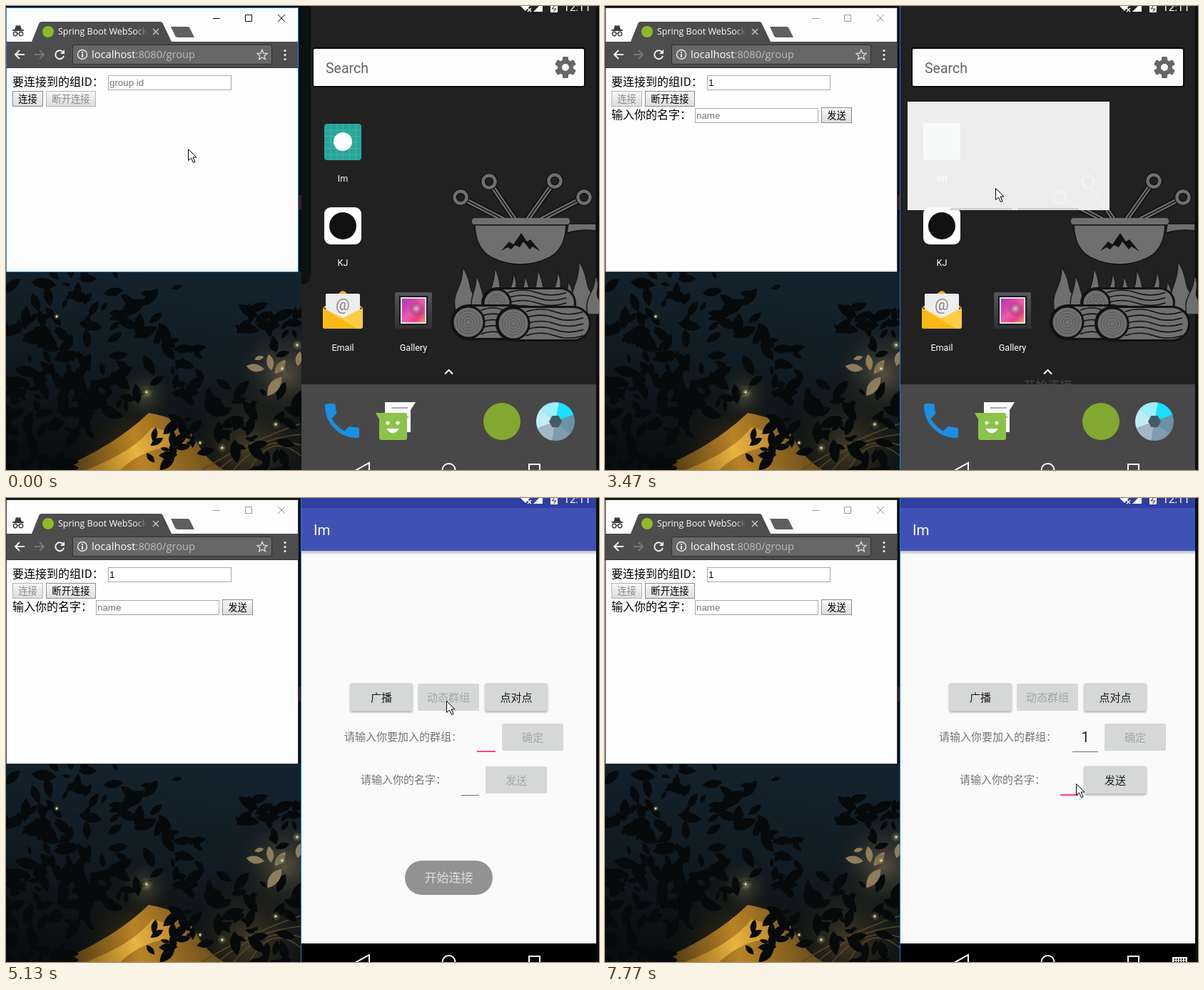
Write an HTML page with a canvas that moves like this. It is 831 px wide and 650 px high and loops after 8 s.

```html
<!DOCTYPE html>
<html lang="zh">
<head>
<meta charset="utf-8">
<style>
html, body { margin: 0; width: 100%; height: 100%; overflow: hidden; background: #080c0e; }
canvas { display: block; }
</style>
</head>
<body>
<canvas id="stage" width="831" height="650"></canvas>
<script>
const W = 831, H = 650, LOOP = 8000;
const CJK = '"Noto Sans CJK SC","Noto Sans CJK",sans-serif';
const ROBOTO = 'Roboto,sans-serif', SEGOE = '"Open Sans",sans-serif', ARIAL = '"Liberation Sans",sans-serif';
const PINK = '#ff4081', BLUE = '#1883d7';
const SWITCH = 2900; // the phone window takes the focus
const stage = document.getElementById('stage').getContext('2d');
let g = stage;

// Drawing helpers
function box(x, y, w, h, color, r = 0) {
  g.fillStyle = color;
  g.beginPath();
  g.roundRect(x, y, w, h, r);
  g.fill();
}
function frame(x, y, w, h, color, lw = 1) {
  g.strokeStyle = color;
  g.lineWidth = lw;
  g.strokeRect(x + lw / 2, y + lw / 2, w - lw, h - lw);
}
function disc(x, y, r, color, stroke, lw = 1) {
  g.beginPath();
  g.arc(x, y, r, 0, 7);
  if (color) { g.fillStyle = color; g.fill(); }
  if (stroke) { g.strokeStyle = stroke; g.lineWidth = lw; g.stroke(); }
}
function shape(d, color, stroke, lw = 1) {
  const p = new Path2D(d);
  if (color) { g.fillStyle = color; g.fill(p); }
  if (stroke) { g.strokeStyle = stroke; g.lineWidth = lw; g.stroke(p); }
}
function text(s, x, y, size, color, font = CJK, align = 'left') {
  g.font = size + 'px ' + font;
  g.textAlign = align;
  g.fillStyle = color;
  g.fillText(s, x, y);
}
function fade(gradient, ...colors) {
  colors.forEach((c, i) => gradient.addColorStop(i / (colors.length - 1), c));
  return gradient;
}
function glow(x, y, r, color) {
  box(x - r, y - r, 2 * r, 2 * r, fade(g.createRadialGradient(x, y, 0, x, y, r), color, 'transparent'));
}
function at(x, y, k, draw) {
  g.save();
  g.translate(x, y);
  g.scale(k, k);
  draw();
  g.restore();
}
function layer(draw) {
  const c = document.createElement('canvas');
  c.width = W;
  c.height = H;
  g = c.getContext('2d');
  draw();
  g = stage;
  return c;
}
let seed = 23;
const rnd = () => (seed = seed * 16807 % 2147483647) / 2147483647;

// Desktop wallpaper: foliage, golden light, sparks
function leaves(x, y, spread, n, color = '#060a0b') {
  while (n--) {
    const r = 6 + 12 * rnd();
    g.save();
    g.translate(x + spread * (rnd() + rnd() - 1), y + spread * .7 * (rnd() + rnd() - 1));
    g.rotate(rnd() * 6.3);
    shape(`M${-r} 0Q0 ${-r * .9} ${r} 0Q0 ${r * .8} ${-r} 0`, color);
    g.restore();
  }
}
function drawDesk() {
  box(0, 0, W, H, '#080f12');
  box(0, 372, 414, 278, fade(g.createLinearGradient(200, 372, 150, 650), '#13232d', '#101b22', '#0a0e10'));
  glow(390, 515, 85, 'rgba(135,115,80,.6)');
  glow(340, 620, 110, 'rgba(105,85,45,.6)');
  glow(185, 630, 110, 'rgba(120,85,25,.55)');
  glow(195, 545, 45, 'rgba(110,110,75,.55)');
  shape('M70 650Q150 618 200 570Q252 578 268 612Q280 635 305 650Z',
    fade(g.createLinearGradient(90, 650, 280, 600), '#4d3812', '#b98326', '#6e501d'));
  shape('M112 650Q180 624 205 590Q245 600 255 618Q200 612 160 650Z',
    fade(g.createLinearGradient(115, 650, 250, 605), '#94691d', '#e9b440', '#b07d25'));
  for (let i = 0; i < 4; i++)
    shape(`M${275 + i * 22} 650Q${335 + i * 12} ${612 - i * 6} 413 ${585 + i * 15}`, null, '#574722', 1.5);
  [[150, 405, 110, 34], [50, 440, 90, 26], [40, 510, 100, 50], [120, 540, 90, 40], [30, 600, 100, 50],
    [240, 500, 80, 22], [240, 610, 48, 16], [300, 560, 70, 26], [370, 450, 70, 22], [340, 620, 70, 18], [385, 560, 50, 12]]
    .forEach(mass => leaves(...mass));
  leaves(380, 510, 50, 6, '#8d7d5c');
  [[197, 541, 13], [378, 586, 9], [408, 475, 10], [71, 435, 6], [303, 619, 9], [272, 612, 6], [387, 508, 9]]
    .forEach(([x, y, r]) => {
      glow(x, y, r, 'rgba(200,195,135,.75)');
      disc(x, y, 1.4, '#e6dfb8');
    });
  box(409, 265, 5, 20, '#431a1b');
}

function flame(x, tip, w, lean) {
  const base = 432, mid = (tip + base) / 2;
  shape(`M${x - w} ${base}C${x - w * 1.7} ${mid} ${x + lean} ${mid} ${x + lean} ${tip}` +
    `C${x + lean + w} ${tip + 18} ${x + w * .3} ${mid - 4} ${x + w * .8} ${mid + 4}Q${x + w * 1.6} ${mid + 16} ${x + w} ${base}Z`,
    '#6f6f6f', '#1b1b1b', 1.5);
}
function drawCampfire() {
  const grey = '#6f6f6f', ink = '#121212';
  [[637, 268, 697], [677, 246, 713], [769, 245, 731], [810, 268, 750]].forEach(([x, y, end]) => {
    const stick = `M${x} ${y}L${end} 299`;
    shape(stick, null, ink, 10);
    shape(stick, null, grey, 6);
    shape(stick, null, ink, 1.5);
    disc(x, y, 8.5, '#212121', ink, 7);
    disc(x, y, 8.5, null, grey, 4.5);
  });
  shape('M788 305H827V315Q805 312 786 318Z', grey, ink, 1.5);
  shape('M657 306H785Q784 340 762 352Q742 362 721 362Q700 362 680 352Q658 340 657 306Z', grey, ink, 1.5);
  box(653, 297, 137, 9, grey, 4);
  box(657, 306, 129, 1.5, ink);
  shape('M694 343L705 330L711 334L722 318L730 330L735 327L749 344L738 337L734 341L725 330L720 338L713 335L708 341L703 338Z', ink);
  [[644, 366, 13, -4], [663, 377, 9, -4], [687, 367, 10, -2], [708, 374, 9, 3], [729, 378, 9, -2],
    [749, 369, 9, -4], [771, 372, 9, 2], [791, 384, 8, -3], [808, 358, 13, -5], [823, 376, 8, 3]].forEach(f => flame(...f));
  [[688, 416, 108, 19], [648, 443, 85, 22], [711, 445, 106, 22]].forEach(([x, y, len, r]) => {
    box(x - r - 3, y - r - 3, len + r + 6, 2 * r + 6, ink, r + 3);
    box(x - r, y - r, len + r, 2 * r, grey, r);
    for (let k = -2; k < 3; k++) {
      const v = y + k * r * .38;
      shape(`M${x + r * .8} ${v}q${len * .2} -7 ${len * .38} 0t${len * .38} 0`, null, ink, 1.6);
    }
    disc(x, y, r, grey, ink, 3);
    for (let k = 4; k < r - 3; k += 4) disc(x, y, k, null, '#555', 1);
  });
}

function statusIcons() {
  shape('M720 -1H735L728 7ZM739 8L752 -5V8Z', '#fff');
  shape('M731 3l5 5m0-5l-5 5', null, '#fff', 1.5);
  box(763, -2, 10, 11, '#fff', 1);
  shape('M768.5 0l-3 4h5l-3 4', null, '#444', 1.2);
  text('12:11', 781, 7, 15.4, '#fff', ROBOTO);
}
function navKeys() {
  shape('M509 640V660L491 650Z', null, '#fff', 2);
  disc(620.5, 650, 9, null, '#fff', 2);
  frame(732, 641, 17, 18, '#fff', 2);
}

function drawHome() {
  box(414, 0, 413, H, '#212121');
  drawCampfire();
  statusIcons();
  box(429, 58, 383, 56, '#0a0a0a', 4);
  box(431, 60, 379, 52, '#fdfdfd', 2);
  text('Search', 448, 93.5, 19.5, '#666', ROBOTO);
  at(784, 86, 1, () => {
    for (let i = 0; i < 3; i++) {
      box(-4, -15, 8, 30, '#666', 1.5);
      g.rotate(Math.PI / 3);
    }
    disc(0, 0, 8, '#fdfdfd', '#666', 6);
  });
  box(446, 165, 52, 51, '#26a69a', 4);
  for (let i = 1; i < 6; i++) {
    box(446 + i * 8.7, 165, 1, 51, '#45b3a8');
    box(446, 165 + i * 8.5, 52, 1, '#45b3a8');
  }
  disc(472, 190, 13, '#fff');
  box(446, 282, 52, 52, '#fff', 9);
  disc(472, 308, 19, '#111');
  // Mail and pictures
  shape('M444 423L468 401Q472 397 476 401L500 423Z', '#f7a81b');
  box(448, 403, 48, 40, '#ededed', 2);
  text('@', 472, 426, 22, '#858585', ROBOTO, 'center');
  shape('M444 423L472 437L500 423V449Q500 452 497 452H447Q444 452 444 449Z', '#ffcd45');
  shape('M444 423L492 452H447Q444 452 444 449Z', '#fbb917');
  box(545, 401, 52, 51, fade(g.createLinearGradient(0, 401, 0, 452), '#54565c', '#303034'), 2);
  box(551, 406, 40, 41, '#1a1a1c');
  box(553, 408, 36, 37, '#e9e4e6');
  box(555, 410, 32, 33, fade(g.createLinearGradient(555, 410, 587, 443), '#9a45b5', '#d23fae', '#ee5cae', '#e4408a', '#f59a55'));
  glow(575, 424, 11, 'rgba(255,215,240,.8)');
  [['Im', 472, 246], ['KJ', 472, 364], ['Email', 472, 482.5], ['Gallery', 571, 482.5]]
    .forEach(([s, x, y]) => text(s, x, y, 12.6, '#fff', ROBOTO, 'center'));
  shape('M615 515.5L620.5 510L626 515.5', null, '#fff', 2);
  // Dock
  box(414, 530, 413, 120, '#484848');
  at(439, 549, 2.67, () => shape('M6.6 10.8c1.4 2.8 3.8 5.1 6.6 6.6l2.2-2.2c.3-.3.7-.4 1-.2 1.1.4 2.3.5 3.6.5.6 0 1 .5 1 1V20c0 .6-.4 1-1 1C10.6 21 3 13.4 3 4c0-.6.5-1 1-1h3.5c.6 0 1 .4 1 1 0 1.2.2 2.5.6 3.6.1.3 0 .7-.3 1Z', '#1b8fe2'));
  shape('M531 555H574L567 566V597H531Z', '#fafafa');
  box(540, 562, 23, 2, '#aaa');
  box(556, 575, 8, 2, '#aaa');
  shape('M518 570H560Q562 570 562 573V605Q562 608 559 608H526Q523 608 523 605V579Z', '#8bc34a');
  disc(535, 584, 2.5, '#fff');
  disc(549, 584, 2.5, '#fff');
  shape('M533 592Q542 605 551 592Z', '#fff');
  disc(695, 582, 26, '#83a82f');
  ['#18e0ff', '#6a93a8', '#7f9dae', '#9fb9c6', '#c0edf5', '#9eeefb'].forEach((c, i) => {
    const a = -1.4 + i * Math.PI / 3;
    g.fillStyle = c;
    g.beginPath();
    g.moveTo(770, 582);
    g.arc(770, 582, 27, a, a + 1.06);
    g.fill();
  });
  shape('M761 582L765.5 574H774.5L779 582L774.5 590H765.5Z', '#455a64');
  navKeys();
}

// Browser window
function field(x, y, value, hint, focus) {
  box(x, y, 173, 21, '#fff');
  frame(x, y, 173, 21, focus ? '#5b9dd9' : '#a9a9a9', focus ? 2 : 1);
  text(value || hint, x + 2, y + 15, 13.33, value ? '#000' : '#757575', ARIAL);
}
function webButton(s, x, y, w, on) {
  box(x, y, w, 22, fade(g.createLinearGradient(0, y, 0, y + 22), '#f8f8f8', '#dcdcdc'));
  frame(x, y, w, 22, on ? '#8c8c8c' : '#b4b4b4');
  text(s, x + w / 2, y + 16, 13.33, on ? '#000' : '#8a8a8a', CJK, 'center');
}
function drawBrowser(t) {
  const active = t < SWITCH, joined = t >= 1780, ink = active ? '#111' : '#999';
  box(0, 2, 410, 371, active ? BLUE : '#3b3f42');
  box(1, 3, 408, 369, '#fdfdfd');
  shape('M36 50L46 25Q47 22 50 22H216Q219 22 220 25L232 50Z', '#4d4d4d');
  shape('M231 29H254Q256 29 257 30L264 44H241Q238 44 237 42Z', '#606060');
  disc(59, 36, 8, '#8fb92c');
  g.save();
  g.beginPath();
  g.rect(70, 22, 126, 28);
  g.clip();
  text('Spring Boot WebSocket', 73, 40, 12.5, fade(g.createLinearGradient(182, 0, 197, 0), '#fff', '#4d4d4d'), SEGOE);
  g.restore();
  shape('M206 32l8 8m0-8l-8 8', null, '#ccc', 1.4);
  shape('M290 17.5h10M335.5 12.5h9v9h-9zM381 12l10 10m0-10l-10 10', null, ink);
  shape('M12 33L14 27Q17 28 20 27L22 33Z', '#3c3c3c');
  box(9, 33, 16, 2, '#3c3c3c', 1);
  disc(13, 39, 2.7, null, '#3c3c3c', 1.4);
  disc(21, 39, 2.7, null, '#3c3c3c', 1.4);
  box(16, 38, 2, 1, '#3c3c3c');
  box(1, 50, 408, 36, '#4d4d4d');
  box(1, 86, 408, 1, '#333');
  shape('M26 68H13M19 62L13 68L19 74', null, '#eee', 2);
  shape('M40 68H53M47 62L53 68L47 74', null, '#777', 2);
  shape('M80 64.5A6 6 0 1 0 81 70', null, '#eee', 2);
  shape('M82 61V67H76Z', '#eee');
  box(93, 54, 280, 28, '#303030', 3);
  box(94, 55, 278, 26, '#676767', 2);
  disc(107, 68, 6.5, null, '#eee', 1.4);
  box(106, 67, 2, 5, '#eee');
  box(106, 64, 2, 2, '#eee');
  text('localhost', 120, 73, 14.7, '#fff', SEGOE);
  text(':8080/group', 120 + g.measureText('localhost').width, 73, 14.7, '#bbb', SEGOE);
  shape('M359 61.5l2 4.6 5 .4-3.800 3.300 1.200 4.900-4.400-2.600-4.400 2.600 1.200-4.900-3.800-3.300 5-.4Z', null, '#ddd', 1.3);
  [62, 68, 74].forEach(y => disc(391, y + .5, 1.6, '#eee'));

  text('要连接到的组ID：', 9, 112, 16, '#000');
  field(143, 97, t >= 900 ? '1' : '', 'group id', t >= 530 && !joined);
  webButton('连接', 9, 119, 43, !joined);
  webButton('断开连接', 56, 119, 70, joined);
  if (joined) {
    text('输入你的名字：', 9, 158, 16, '#000');
    field(126, 143, '', 'name');
    webButton('发送', 303, 142, 43, true);
  }
}

// Phone app
function appButton(s, x, y, on) {
  if (on) {
    g.save();
    g.shadowColor = 'rgba(0,0,0,.35)';
    g.shadowBlur = 3;
    g.shadowOffsetY = 1.5;
    box(x - .5, y - .5, 87, 39, '#d6d7d7', 2);
    g.restore();
  } else box(x, y, 86, 38, '#d6d7d7', 2);
  text(s, x + 43, y + 24.5, 15, on ? '#1c1c1c' : '#a5a6a6', CJK, 'center');
}
function underline(x, y, w, focus) {
  if (focus) box(x, y - 1, w, 2, PINK);
  else box(x, y, w, 1, '#757575');
}
function drawApp(t) {
  const dy = t < 4670 ? 1 : 0, group = t >= 4800, y = group ? 260 : 265;
  box(414, 0, 413, H, '#fafafa');
  box(414, 74 + dy, 413, 5, fade(g.createLinearGradient(0, 74, 0, 80), 'rgba(0,0,0,.25)', 'transparent'));
  box(414, 14, 413, 60 + dy, '#3f51b5');
  box(414, 0, 413, 14 + dy, '#303f9f');
  statusIcons();
  text('Im', 431, 52 + dy, 20.5, '#fff', ROBOTO);
  box(414, 624 + dy, 413, 26, '#000');
  navKeys();
  appButton('广播', 483, y, group);
  appButton('动态群组', 577, y, !group);
  appButton('点对点', 672, y, true);
  if (group) {
    const typed = t >= 6150, sure = t >= 6540, naming = t >= 7200, shift = typed ? 5 : 0;
    text('请输入你要加入的群组：', 474 - shift * 1.2, 340, 15, '#757575');
    underline(660 - shift, 355, typed ? 36 : 26, !naming);
    if (typed) text('1', 673, 342, 20, '#222', ROBOTO, 'center');
    if (typed && !naming) box(676.5, 321, 2, 27, PINK);
    appButton('确定', 695 + shift, 316, typed && !sure);
    text('请输入你的名字：', 497, 400, 15, '#757575');
    underline(638, 416, 25, naming);
    appButton('发送', 672, 376, sure);
    if (t >= 5950) {
      box(795, 643, 21, 10, '#fff', 1);
      for (let i = 0; i < 10; i++) box(797.5 + i % 5 * 3.5, 645 + (i / 5 | 0) * 3, 2, 2, '#000');
    }
  } else {
    text('请输入你的名字：', 544, 345, 15, '#757575');
    underline(681, 361, 25, true);
    appButton('发送', 577, 377, true);
  }
  g.globalAlpha = track(toast, t)[0];
  box(559, 508, 123, 48, '#646464', 24);
  text('开始连接', 620.5, 538, 17, '#fff', CJK, 'center');
  g.globalAlpha = 1;
}

// First glimpse of the app window, over the home screen
function drawOpening() {
  box(424, 134, 283, 152, 'rgba(250,250,250,.94)');
  box(446, 164, 52, 52, '#f6faf9', 3);
  text('Im', 472, 246, 12.6, '#fff', ROBOTO, 'center');
  box(484, 283, 86, 3, '#d0d1d1');
  box(578, 283, 86, 3, '#d0d1d1');
  text('开始连接', 620.5, 538, 17, '#484848', CJK, 'center');
}

// Timing: bursts of evenly spaced steps with rests between
const bursts = [[0, 0, 1], [120, 960, 7], [1370, 2360, 8], [2480, 3470, 8], [3590, 4520, 8], [4670, 5640, 8], [5910, 6930, 9], [7080, 7770, 6]];
function snap(t) {
  const [from, to, n] = bursts.findLast(b => t >= b[0]);
  if (n < 2) return from;
  const step = (to - from) / (n - 1);
  return Math.min(to, from + Math.floor((t - from) / step + .2) * step);
}
function track(keys, t) {
  const i = keys.findIndex(k => k[0] > t);
  if (i < 0) return keys.at(-1).slice(1);
  if (!i) return keys[0].slice(1);
  const a = keys[i - 1], b = keys[i], u = (t - a[0]) / (b[0] - a[0]);
  return a.slice(1).map((v, k) => v + (b[k + 1] - v) * u);
}
const toast = [[3500, 0], [3723, .74], [4000, 1], [4900, 1], [5086, .69], [5250, 0], [5370, 0], [5640, 1], [7100, 1], [7450, 0]];
const pointer = [[0, 255, 200], [400, 215, 108], [1300, 215, 108], [1650, 30, 128], [1800, 30, 128], [2360, 440, 194], [2621, 472, 194],
  [2904, 472, 194], [3470, 547, 255], [3740, 547, 255], [4520, 610, 278], [4670, 617, 284], [5100, 617, 284], [5640, 668, 338],
  [6050, 668, 338], [6292, 715, 343], [6550, 722, 341], [6930, 662, 398], [7080, 660, 400]];
function drawPointer(t) {
  const [x, y] = track(pointer, t).map(Math.round);
  at(x + .5, y + .5, 1, () => {
    if (x > 143 && x < 316 && y > 97 && y < 118) shape('M-3 -8H3M0 -8V8M-3 8H3', null, '#000');
    else shape('M0 0V16L4 12.5L7 19L9.5 18L6.5 11.5H11.5Z', '#fff', '#000');
  });
}

const desk = layer(drawDesk), home = layer(drawHome);
function draw(t) {
  g.drawImage(desk, 0, 0);
  if (t < 3590) {
    g.drawImage(home, 0, 0);
    if (t < SWITCH) box(414, 0, 13, 390, '#0c1112', [0, 0, 13, 0]);
    if (t >= 3470) drawOpening();
  } else drawApp(t);
  if (t >= SWITCH) box(413, 0, 1, H, BLUE);
  drawBrowser(t);
  drawPointer(t);
}
let last = -1;
function tick() {
  const t = snap(performance.now() % LOOP);
  if (t !== last) draw(last = t);
  requestAnimationFrame(tick);
}
tick();
</script>
</body>
</html>
```
